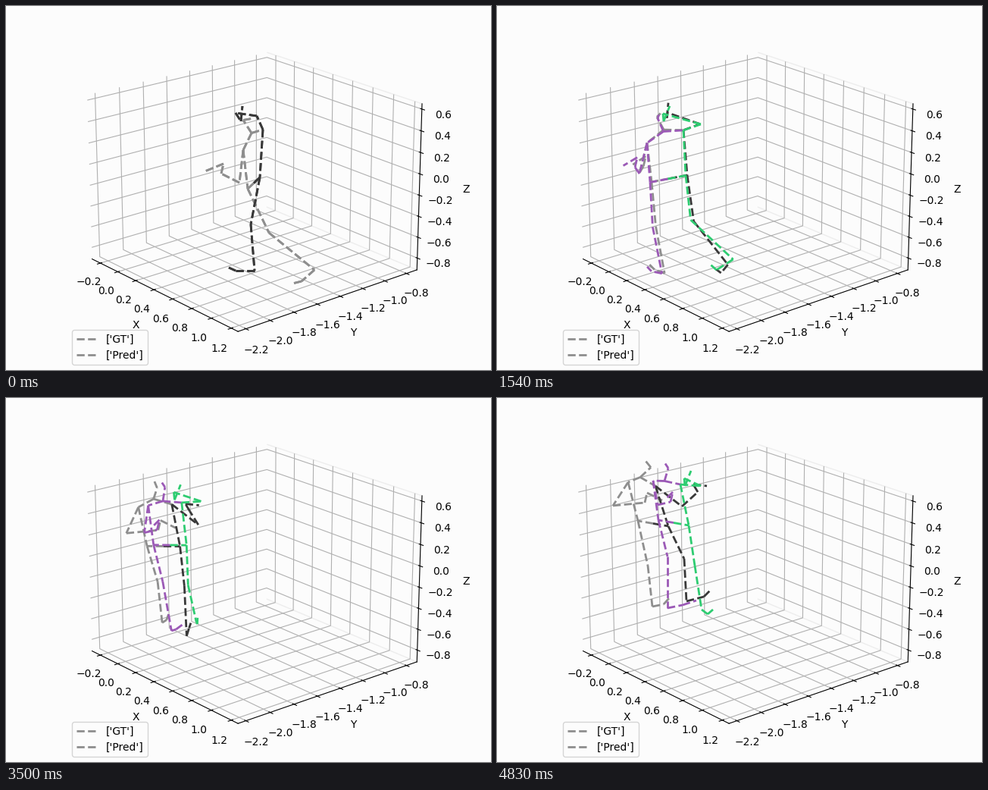
Write a matplotlib script that moves like this. It is 640 px wide and 480 px high and loops after 4900 ms.

```python
import matplotlib.pyplot as plt
import numpy as np
from matplotlib.animation import FuncAnimation
from matplotlib.lines import Line2D
from matplotlib.ticker import MultipleLocator

W, H, DPI = 640, 480, 100
FRAMES, STEP = 70, 70
SPLIT = 20  # first frame of the predicted part
PAPER = "#fcfcfc"
GREY, DARK = "#8e8e8e", "#383838"
PURPLE, GREEN = "#9b59b6", "#2ecc71"

# The pelvis travels across the stage; every other part is a bone vector
# from its parent joint. Each has a few turning points, {frame: (dx, dy)}.
TRUNK = dict(
    root={0: (327, 233.5), 22: (227.5, 227.5), 33: (210.5, 218.5), 69: (206, 165.5)},
    hip={0: (8, -7.5), 22: (23.5, -4.5), 69: (20, 3.5)},
    spine={0: (-1, -57), 69: (-15, -52)},
    shoulder={0: (13, -13.5), 28: (25, -7), 69: (18, 2.5)},
    neck={0: (-2, -9)},
    face={18: (-11, -17), 69: (14, -13)},
    crown={0: (11, -2), 69: (-9, -11)},
)
ARMS = dict(
    l_upper={0: (-5, 43), 69: (-20, 31)},
    l_fore={0: (-24, -12), 50: (42, -4)},
    l_palm={0: (3, -13)},
    l_tip={0: (-27, 11), 18: (-20, 11), 50: (20, 10)},
    r_upper={0: (-8, -18), 22: (22, -8), 36: (35, 27)},
    r_fore={0: (-28, -4), 22: (-43, -15), 69: (21, -19)},
    r_palm={0: (7, 11), 22: (-1, 7), 36: (-6, -10)},
    r_tip={22: (2, -20), 36: (18, 2)},
)
LEGS = dict(
    l_thigh={0: (28, 58), 13: (-10, 55), 28: (14, 61), 50: (14, 47), 69: (13, 59)},
    l_shin={0: (60, 49), 13: (-2, 60), 28: (19, 62), 50: (6, 54)},
    l_foot={0: (-17, 15), 13: (-16, -5), 63: (15, -3)},
    l_toe={0: (-12, 3), 13: (-9, -6), 63: (7, -8)},
    r_thigh={0: (-12, 62), 13: (11, 62), 40: (2, 56), 69: (21, 43)},
    r_shin={0: (5, 61), 22: (45, 57), 33: (3, 49), 50: (3, 66),
            63: (-18, 61), 69: (3, 56)},
    r_foot={0: (-25, 0), 22: (-9, 11), 44: (-1, -11), 69: (23, -6)},
    r_toe={13: (-9, -4), 69: (8, -8)},
)

# Where the prediction turns elsewhere after the split.
TRUNK_DRIFT = dict(
    root={22: (225.5, 228), 33: (208, 217.5), 69: (233, 164.5)},
    spine={69: (-9, -53)},
    neck={69: (-3, -2)},
    face={33: (0, -19), 69: (5, -17)},
    crown={36: (-4, -6)},
)
ARM_DRIFT = dict(
    l_upper={33: (-11, 39), 69: (6, 32)},
    l_fore={50: (17, -4)},
    l_tip={50: (-8, 8)},
    r_upper={22: (23, -8), 69: (27, 2)},
    r_fore={22: (-50, -14), 69: (-22, -10)},
    r_palm={22: (1, 10)},
    r_tip={22: (8, -20)},
)
LEG_DRIFT = dict(
    l_thigh={28: (11, 61), 50: (12, 48)},
    l_shin={28: (20, 62), 69: (0, 68)},
    l_foot={33: (-9, 0), 63: (20, -4)},
    l_toe={69: (18, -6)},
    r_thigh={36: (-2, 52), 63: (8, 53)},
    r_shin={22: (56, 52), 33: (14, 45), 69: (9, 58)},
    r_foot={22: (-22, 14), 33: (-7, 0), 69: (8, 6)},
    r_toe={36: (-4, -9), 69: (7, -6)},
)


def diverge(keys, drift):
    past = {f: v for f, v in keys.items() if f < SPLIT}
    return past | drift


GT = TRUNK | ARMS | LEGS
DRIFT = TRUNK_DRIFT | ARM_DRIFT | LEG_DRIFT
PRED = {part: diverge(keys, DRIFT[part]) if part in DRIFT else keys
        for part, keys in GT.items()}


def glide(keys, t):
    """Smooth path through the turning points, without overshoot."""
    times = np.array(list(keys), float)
    pts = np.array(list(keys.values()), float)
    if len(times) == 1:
        return pts[0]
    t = np.clip(t, times[0], times[-1])
    rate = np.diff(pts, axis=0) / np.diff(times)[:, None]
    a, b = rate[:-1], rate[1:]
    mid = np.where(a * b > 0, 2 * a * b / (a + b + (a + b == 0)), 0)
    slope = np.vstack([rate[:1], mid, rate[-1:]])
    i = min(np.searchsorted(times, t, side="right"), len(times) - 1) - 1
    span = times[i + 1] - times[i]
    s = (t - times[i]) / span
    ease = s * s * (3 - 2 * s)
    bend = slope[i] * s * (1 - s) ** 2 - slope[i + 1] * s * s * (1 - s)
    return pts[i] + (pts[i + 1] - pts[i]) * ease + bend * span


def skeleton(parts, t):
    """Left and right bones as pairs of stage points."""
    v = {name: glide(keys, t) for name, keys in parts.items()}

    def limb(start, *names):
        pts = np.cumsum([start] + [v[n] for n in names], axis=0)
        return list(zip(pts[:-1], pts[1:]))

    root = v["root"]
    chest = root + v["spine"]
    neck = chest + v["neck"]
    l_hip, r_hip = root - v["hip"], root + v["hip"]
    l_sho, r_sho = chest - v["shoulder"], chest + v["shoulder"]
    left = [(neck, l_sho), (neck, r_sho), (l_sho, l_hip), (root, l_hip)]
    left += limb(neck, "face", "crown")
    left += limb(l_sho, "l_upper", "l_fore", "l_palm", "l_tip")
    left += limb(l_hip, "l_thigh", "l_shin", "l_foot", "l_toe")
    right = [(r_sho, r_hip), (root, r_hip)]
    right += limb(r_sho, "r_upper", "r_fore", "r_palm", "r_tip")
    right += limb(r_hip, "r_thigh", "r_shin", "r_foot", "r_toe")
    return left, right


fig = plt.figure(figsize=(W / DPI, H / DPI), dpi=DPI, facecolor=PAPER)


def build_room():
    ax = fig.add_axes([0, 0, 1, 1], projection="3d")
    ax.set_facecolor("none")
    ax.view_init(elev=20, azim=-40)
    reach = 0.75 * 25 / 24
    x, y, z = 0.485, -1.483, -0.1325
    ax.set_xlim(x - reach, x + reach)
    ax.set_ylim(y - reach, y + reach)
    ax.set_zlim(z - reach, z + reach)
    ax.set_xlabel("X")
    ax.set_ylabel("Y")
    ax.set_zlabel("Z")
    for axis in (ax.xaxis, ax.yaxis, ax.zaxis):
        axis.set_major_locator(MultipleLocator(0.2))
        axis.set_pane_color((1, 1, 1, 0))
    ax.yaxis.set_pane_color((0.93, 0.93, 0.93, 1))
    ax.yaxis.pane.set_fill(False)
    handles = [Line2D([], [], color=GREY, lw=2, ls="--") for _ in range(2)]
    ax.legend(handles, ["['GT']", "['Pred']"], loc="lower left", facecolor=PAPER)


build_room()
stage = fig.add_axes([0, 0, 1, 1])
stage.set_xlim(0, W)
stage.set_ylim(H, 0)
stage.axis("off")


def build_body():
    return [[stage.plot([], [], "--", lw=2)[0] for _ in side]
            for side in skeleton(GT, 0)]


gt_body, pred_body = build_body(), build_body()


def place(body, bones, colors):
    for lines, side, color in zip(body, bones, colors):
        for line, ends in zip(lines, side):
            line.set_data(*np.transpose(ends))
            line.set_color(color)


def update(frame):
    real = skeleton(GT, frame)
    place(gt_body, real, (GREY, DARK))
    if frame < SPLIT:
        place(pred_body, real, (GREY, DARK))
    else:
        place(pred_body, skeleton(PRED, frame), (PURPLE, GREEN))
    return []


anim = FuncAnimation(fig, update, frames=FRAMES, interval=STEP, repeat=True,
                     repeat_delay=0, blit=False)
plt.show()
```
